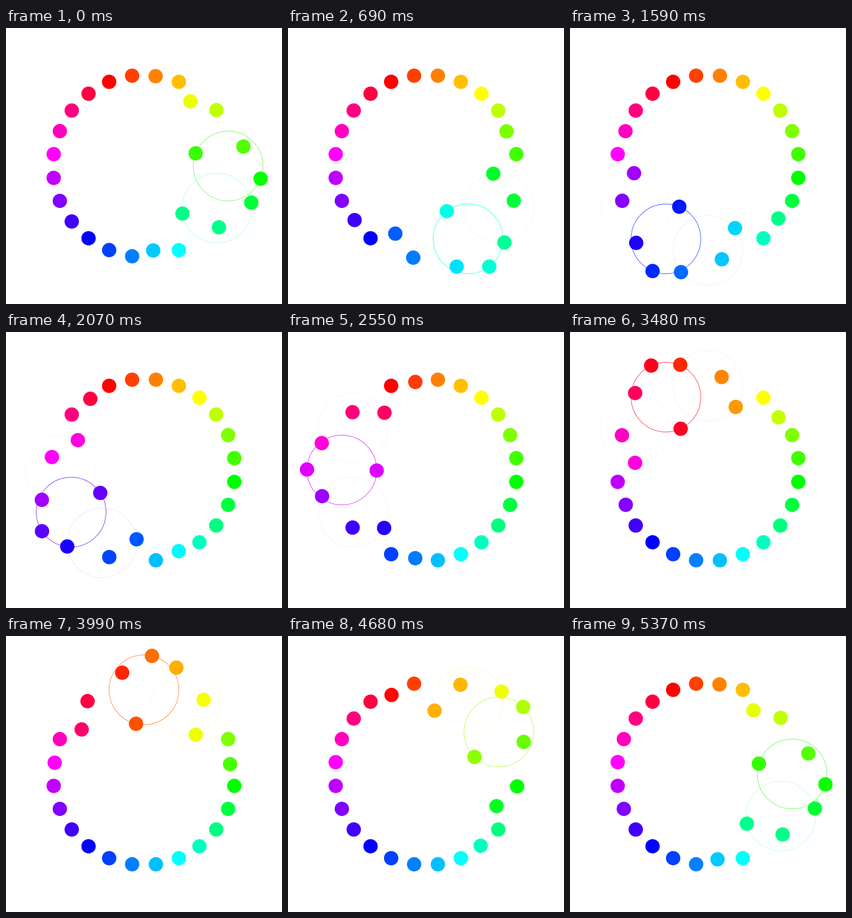
An HTML page with a canvas that plays this animation: 500 px wide and 500 px high, repeating every 5400 ms.

```html
<!DOCTYPE html>
<html lang="en">
<head>
<meta charset="utf-8">
<title>Colour wheel swaps</title>
<style>
  html, body { margin: 0; width: 100%; height: 100%; overflow: hidden; background: #fff; }
  canvas { display: block; width: 500px; height: 500px; }
</style>
</head>
<body>
<canvas id="stage" width="500" height="500"></canvas>
<script>
const ctx = document.getElementById('stage').getContext('2d');
const TAU = Math.PI * 2;
const rad = deg => deg * Math.PI / 180;

const LOOP = 5400, TICK = 30;
const PAIRS = 12, DELAY = LOOP / PAIRS;
const SWAP = 2600;        // length of one half turn
const LEAD = 156;         // time since the first pair was halfway, at t = 0
const RING = 165, HALF_GAP = 22.5, DOT = 13;
const ORBIT = RING * Math.sin(rad(HALF_GAP));
const HUB = RING * Math.cos(rad(HALF_GAP));

function progress(t, k) {
  let s = (t + LEAD - k * DELAY) % LOOP;
  if (s < -LOOP / 2) s += LOOP;
  if (s >= LOOP / 2) s -= LOOP;
  const u = Math.min(1, Math.max(0, s / SWAP + 0.5));
  return u - Math.sin(TAU * u) / TAU;
}

const hsl = (hue, alpha = 1) => `hsla(${hue % 360}, 100%, 50%, ${alpha})`;

function circle(x, y, r) {
  ctx.beginPath();
  ctx.arc(x, y, r, 0, TAU);
}

function dot(cx, cy, deg, hue) {
  circle(cx + ORBIT * Math.cos(rad(deg)), cy + ORBIT * Math.sin(rad(deg)), DOT);
  ctx.fillStyle = hsl(hue);
  ctx.fill();
}

function draw(t) {
  ctx.fillStyle = '#fff';
  ctx.fillRect(0, 0, 500, 500);
  const pairs = Array.from({ length: PAIRS }, (_, k) => {
    const angle = k * 360 / PAIRS;
    return {
      angle,
      p: progress(t, k),
      x: 250 + HUB * Math.cos(rad(angle)),
      y: 250 + HUB * Math.sin(rad(angle)),
      hue: 112.5 + angle
    };
  });

  // Orbits fade in around the middle of each swap
  ctx.lineWidth = 1.2;
  for (const { x, y, p, hue } of pairs) {
    const alpha = 0.65 * Math.sin(Math.PI * p) ** 4;
    if (alpha < 0.004) continue;
    circle(x, y, ORBIT);
    ctx.strokeStyle = hsl(hue, alpha.toFixed(3));
    ctx.stroke();
  }

  for (const { x, y, p, hue, angle } of pairs) {
    const turn = angle + 180 * p;
    const shift = HALF_GAP * (2 * p - 1);
    dot(x, y, turn - 90, hue + shift);
    dot(x, y, turn + 90, hue - shift);
  }
}

function frame() {
  const t = performance.now() % LOOP;
  draw(Math.floor(t / TICK) * TICK);
  requestAnimationFrame(frame);
}
frame();
</script>
</body>
</html>
```
